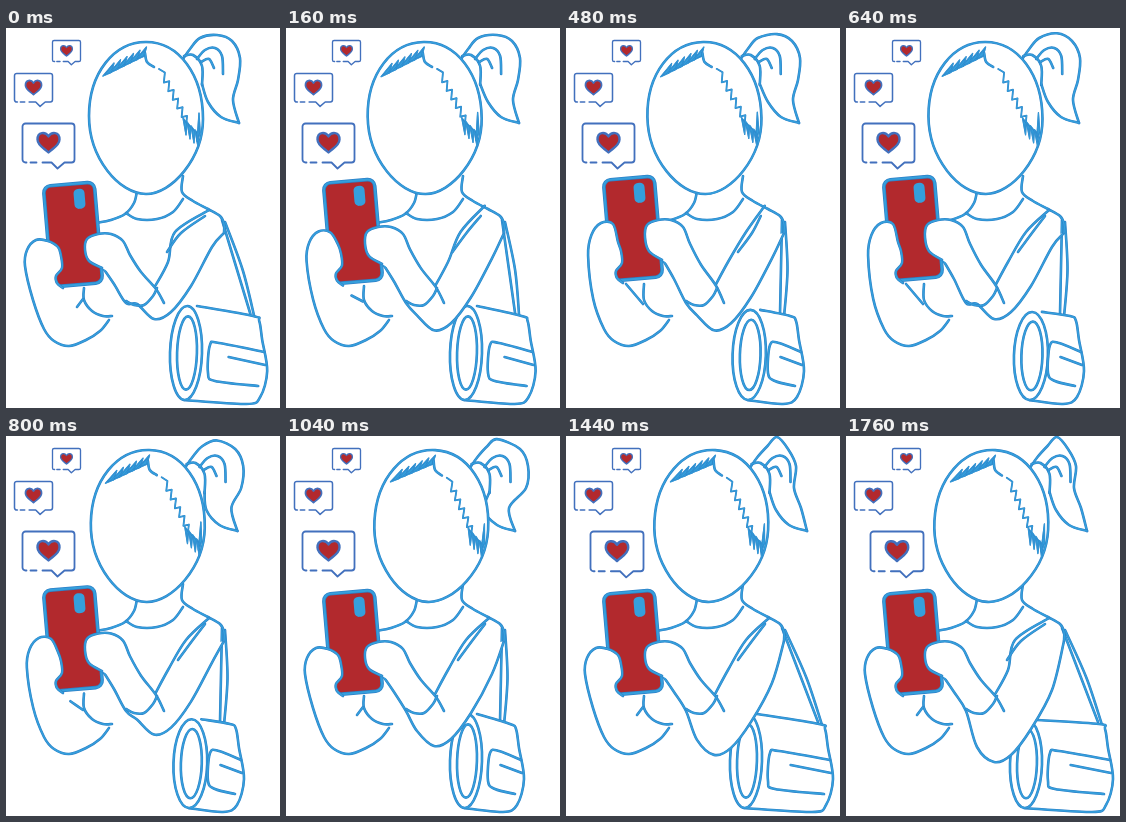
Animation of 274x380 px, one loop 1840 ms. Source, as an HTML page with a canvas:

```html
<!DOCTYPE html>
<html lang="en">
<head>
<meta charset="utf-8">
<title>Girl with phone</title>
<style>
  html, body { margin: 0; width: 100%; height: 100%; overflow: hidden; background: #fff; }
  canvas { display: block; width: 274px; height: 380px; }
</style>
</head>
<body>
<canvas id="stage" width="274" height="380"></canvas>
<script>
const ctx = document.getElementById('stage').getContext('2d');
const LOOP = 1840;
const RED = '#b2292d', BLUE = '#359fdc', EDGE = '#2c7fc6', FRAME = '#4270bd';

const ramp = (t, from, to) => Math.max(0, Math.min(1, (t - from) / (to - from)));
const bump = (t, from, to) => Math.sin(Math.PI * ramp(t, from, to));
const mix = (a, b, k) => a.map((v, i) => v + (b[i] - v) * k);

// How far each part has moved at time t
function poseAt(t) {
  const settle = ramp(t, 1040, 1280);
  const wide = 1 - ramp(t, 0, 320) + ramp(t, 1440, 1760);
  return {
    settle, wide,
    flick: ramp(t, 640, 1040) - settle,
    lift: ramp(t, 0, 320) - ramp(t, 640, 1040),
    lean: -2.5 * ramp(t, 0, 320) + 2 * ramp(t, 320, 640) + 5.5 * ramp(t, 640, 1040),
    elbow: 291 + 16 * bump(t, 0, 640) + 19 * ramp(t, 640, 1040) + 16 * ramp(t, 1040, 1760),
    bagOut: 0.8 - 0.8 * ramp(t, 0, 320) + ramp(t, 1040, 1440),
    bagSway: bump(t, 320, 1040),
    bagDrop: bump(t, 320, 1040) + ramp(t, 1440, 1760),
    hairRise: ramp(t, 320, 1440),
    shrug: bump(t, 0, 640),
    rise: ramp(t, 1200, 1440)
  };
}

// Smooth path through x, y pairs
function curve(...p) {
  const last = p.length / 2 - 1, path = new Path2D();
  const at = i => {
    const j = 2 * Math.max(0, Math.min(last, i));
    return [p[j], p[j + 1]];
  };
  path.moveTo(p[0], p[1]);
  for (let i = 0; i < last; i++) {
    const [a, b, c, d] = [at(i - 1), at(i), at(i + 1), at(i + 2)];
    path.bezierCurveTo(
      b[0] + (c[0] - a[0]) / 6, b[1] + (c[1] - a[1]) / 6,
      c[0] - (d[0] - b[0]) / 6, c[1] - (d[1] - b[1]) / 6, c[0], c[1]);
  }
  return path;
}

function ink(path, width = 2.6) {
  ctx.strokeStyle = EDGE;
  ctx.lineWidth = width;
  ctx.stroke(path);
  ctx.strokeStyle = BLUE;
  ctx.lineWidth = width * 0.6;
  ctx.stroke(path);
}

function fill(path, color = '#fff') {
  ctx.fillStyle = color;
  ctx.fill(path);
}

function shape(path, color, width) {
  fill(path, color);
  ink(path, width);
}

const line = (...p) => ink(curve(...p));

// Shift points near the hand, fading out towards the elbow
const raise = (p, dx, dy) => p.map((v, i) => {
  const y = p[i | 1];
  return v + (i % 2 ? dy : dx) * (1 - ramp(y, 215, 275));
});

function oval(x, y, rx, ry) {
  const path = new Path2D();
  path.ellipse(x, y, rx, ry, 0.03, 0, 7);
  return path;
}

function roundBox(x, y, w, h, r) {
  const path = new Path2D();
  path.roundRect(x - w / 2, y - h / 2, w, h, r);
  return path;
}

function bubble(x, y, w) {
  const s = w / 52, h = 39;
  if (s < 0.07) return;
  ctx.save();
  ctx.translate(x + 0.5, y + 0.5);
  ctx.scale(s, s);
  const box = new Path2D();
  box.moveTo(8, h);
  box.lineTo(14, h);
  box.moveTo(4, h);
  box.arcTo(0, h, 0, h - 4, 3);
  box.arcTo(0, 0, 4, 0, 3);
  box.arcTo(52, 0, 52, 4, 3);
  box.arcTo(52, h, 49, h, 3);
  box.lineTo(42, h);
  box.lineTo(35, h + 6);
  box.lineTo(29, h);
  box.lineTo(20, h);
  ctx.strokeStyle = FRAME;
  ctx.lineWidth = 1 + 0.8 / s;
  ctx.stroke(box);
  const heart = new Path2D();
  heart.moveTo(26, 13);
  heart.bezierCurveTo(23, 8, 15, 8, 15, 16);
  heart.bezierCurveTo(15, 22, 22, 25, 26, 29);
  heart.bezierCurveTo(30, 25, 37, 22, 37, 16);
  heart.bezierCurveTo(37, 8, 29, 8, 26, 13);
  heart.closePath();
  fill(heart, RED);
  ctx.lineWidth = 2.4;
  ctx.stroke(heart);
  ctx.restore();
}

// Each bubble climbs to the next place while a new one grows from the phone
function bubbles({ rise }) {
  const start = [74, 156, 3], big = [16, 95, 52], medium = [8, 45, 38], small = [46, 12, 28];
  if (rise > 0) bubble(...mix(start, [24, 95, 53], rise));
  bubble(...mix(big, medium, rise));
  bubble(...mix(medium, small, rise));
  bubble(...mix(small, [13, 7, 1], rise));
}

function bag({ bagOut, bagSway, bagDrop }) {
  const x = 180 + 5 * bagSway, y = 325 + 3 * bagDrop;
  const rx = 16 + bagSway, ry = 47 - 3 * bagDrop;
  const right = 234 + 29 * bagOut, strapX = 216 + 38 * bagOut;
  line(216, 192, strapX - 2, 286);
  line(219, 194, (219 + strapX) / 2 + 4, 242, strapX + 2, 289);
  shape(curve(x + 11, y - ry, right - 10, 288, right - 4, 293, right - 1, 312, right + 4, 343,
    right - 3, 369, right - 17, 376, x - 2, y + ry));
  shape(oval(x, y, rx, ry));
  ink(oval(x + 1, y, rx * 0.62, ry * 0.78));
  line(right + 1, 324, 213, 315, 204, 317, 202, 345, 209, 353, right - 5, 358);
  line(204 + (right - 204) * 0.35, 329, right + 2, 337);
}

function arm({ elbow, lift }) {
  shape(curve(97, 240 - 8 * lift, 108, 256 - 5 * lift, 120, 275, 131, elbow - 15, 148, elbow,
    165, elbow - 7, 185, elbow - 33, 206, elbow - 72, 218, 205));
}

function torso() {
  line(131, 163, 128, 175, 119, 186, 105, 192, 90, 195);
  line(120, 185, 131, 191, 151, 191, 167, 184, 177, 171);
  line(177, 148, 176, 164, 187, 173, 202, 181, 214, 188, 218, 196, 218, 205);
}

function frontStrap({ wide, shrug }) {
  const bend = 180 - 11 * wide, end = 203 - 6 * shrug;
  line(148, 260, 162, 234, bend, 204, end, 182 - 6 * shrug);
  line(bend - 8, 224, bend + 6, 205, end - 4, 188);
}

function pony({ lean, flick, settle, hairRise }) {
  const base = 177 + lean * 1.5, top = 7 - 6 * hairRise;
  const side = 234 + 8 * flick - 4 * settle, tip = 233 - 4 * flick + 8 * settle, end = 95;
  line(base, 31, base + 7, 21, base + 17, 10, 211, top, side - 8, 13, side, 30,
    side - 2, 52, tip - 6, 72, tip, end);
  line(tip, end, tip - 18, end - 6, tip - 31, end - 21, base + 19, 56);
  line(base + 1, 28, base + 10, 27, base + 19, 38, base + 19, 57);
  line(base + 14, 31, base + 22, 22, base + 32, 20, base + 39, 28, base + 40, 46);
  line(base + 18, 34, base + 26, 31, base + 31, 40);
}

function tuft(x, y, dx, dy) {
  const path = new Path2D();
  path.moveTo(x, y);
  path.lineTo(x + dx, y + dy);
  path.lineTo(x + dx * 0.6 + 2, y + dy * 0.3);
  path.closePath();
  shape(path, BLUE, 1.3);
}

function head({ lean }) {
  ctx.save();
  ctx.translate(142 + lean * 0.25, 166);
  ctx.rotate(lean * 0.0105);
  ctx.translate(-142, -166);
  const face = new Path2D();
  face.moveTo(140, 14);
  face.bezierCurveTo(173, 14, 197, 47, 197, 91);
  face.bezierCurveTo(197, 130, 166, 166, 140, 166);
  face.bezierCurveTo(113, 166, 83, 130, 83, 88);
  face.bezierCurveTo(83, 45, 108, 14, 140, 14);
  shape(face);
  for (let i = 0; i < 6; i++) tuft(97 + 6.5 * i, 48 - 3.2 * i, 11, -13);
  line(139, 25, 141, 34, 148, 39);
  const fringe = new Path2D();
  fringe.moveTo(153, 41);
  for (let s = 0.05; s < 0.75; s += 0.12) {
    const x = 153 + 37 * s, y = 41 + 72 * s;
    fringe.lineTo(x + 4, y);
    fringe.lineTo(x + 3, y + 10);
  }
  ink(fringe, 1.8);
  for (let i = 0; i < 4; i++) tuft(177 + 4 * i, 90 + 4 * i, 3, 17);
  tuft(191, 113, 2, -28);
  ctx.restore();
}

function phone({ lift }) {
  ctx.save();
  ctx.translate(67, 206.5 - 6 * lift);
  ctx.rotate(-0.085);
  shape(roundBox(0, 0, 51, 101, 7), RED, 3.6);
  fill(roundBox(9.5, -35, 11, 20, 4.5), BLUE);
  ctx.restore();
}

function hands({ lift }) {
  const grip = [57, 260, 51, 255, 50, 248, 56, 240, 55, 228, 52, 219];
  const forearm = [42, 213, 30, 212, 21, 222, 19, 238, 27, 272, 38, 301, 48, 313, 63, 318,
    80, 312, 94, 303, 103, 292];
  shape(curve(...grip.map((v, i) => v - (i % 2) * 5 * lift), ...raise(forearm, 5 * lift, -17 * lift)));
  line(78, 260 - 4 * lift, 78, 272, 86, 283, 97, 288, 106, 288);
  line(...mix([77, 271, 71, 279], [77, 276, 60, 256], lift));
  const sleeve = [96, 240, 83, 233, 79, 222, 81, 211, 92, 206, 105, 206, 117, 213, 124, 227,
    135, 244, 150, 261, 158, 275];
  shape(curve(...raise(sleeve, 0, -14 * lift)));
  line(120, 273, 128, 277, 138, 277, 147, 268, 151, 260);
}

function draw(t) {
  const pose = poseAt(t);
  ctx.fillStyle = '#fff';
  ctx.fillRect(0, 0, 274, 380);
  ctx.lineJoin = ctx.lineCap = 'round';
  for (const part of [bubbles, bag, arm, torso, frontStrap, pony, head, phone, hands]) part(pose);
}

// The picture holds for 80 ms, or 40 ms in the quick stretches
function held(t) {
  const quick = (t >= 1280 && t < 1440) || (t >= 1520 && t < 1680);
  const step = quick ? 40 : 80;
  return Math.floor(t / step) * step;
}

const start = performance.now();
function play() {
  draw(held(Math.max(0, performance.now() - start) % LOOP));
  requestAnimationFrame(play);
}
play();
</script>
</body>
</html>
```
